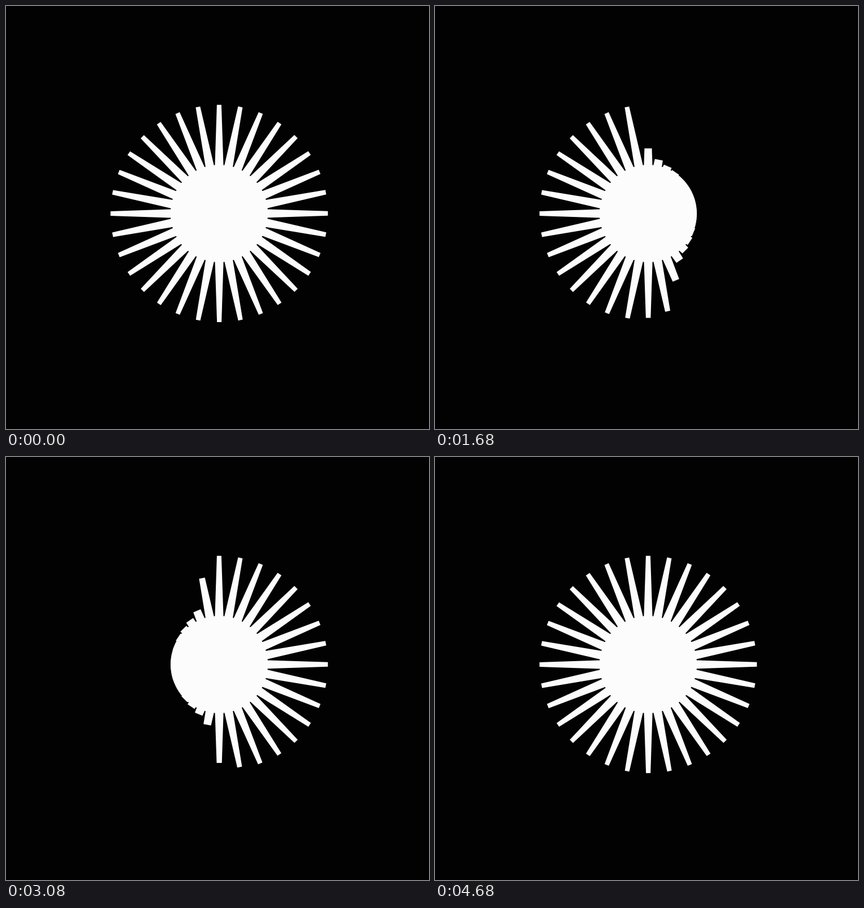
Animation of 748 by 748 pixels, one loop 5 s. Source, as an HTML page with a canvas:

```html
<!DOCTYPE html>
<html>
<head>
<meta charset="utf-8">
<style>
  html, body { margin: 0; height: 100%; overflow: hidden; background: #020202; }
  canvas { display: block; }
</style>
</head>
<body>
<canvas id="stage" width="748" height="748"></canvas>
<script>
const ctx = document.getElementById('stage').getContext('2d');
const LOOP = 5000, STEP = 40, TICK = 1000 / 60;
const RAYS = 32, STAGGER = 5; // ticks between neighbouring rays
const CX = 377, CY = 366.9, TILT = -0.0006;
const DISC = 86, INNER = 85.5, OUTER = 192.2;

// Ease along a bezier with horizontal handles at x1 (start) and x2 (end).
function ease(x, x1, x2) {
  if (x <= 0) return 0;
  if (x >= 1) return 1;
  let lo = 0, hi = 1;
  for (let i = 0; i < 24; i++) {
    const t = (lo + hi) / 2, u = 1 - t;
    if (3 * x1 * t * u * u + 3 * x2 * t * t * u + t * t * t < x) lo = t;
    else hi = t;
  }
  return lo * lo * (3 - 2 * lo);
}

function rayTip(tick) {
  const shrink = ease(tick / 60, 0.95, 0.035);
  const grow = ease((tick - 75) / 50, 1, 0.06);
  return OUTER - (OUTER - INNER) * (shrink - grow);
}

// Rays taper outwards; a shorter ray is the same wedge cut off earlier.
const halfWidth = r => 7.5 - 3.5 * (r - DISC) / (OUTER - DISC);

function drawRay(angle, tip) {
  const base = DISC - 6, wBase = halfWidth(base), wTip = halfWidth(tip);
  ctx.save();
  ctx.rotate(angle);
  ctx.beginPath();
  ctx.moveTo(-wBase, -base);
  ctx.lineTo(-wTip, -tip);
  ctx.lineTo(wTip, -tip);
  ctx.lineTo(wBase, -base);
  ctx.fill();
  ctx.restore();
}

function draw(ms) {
  const held = Math.floor(ms % LOOP / STEP) * STEP;
  const tick = Math.floor(held / TICK + 1e-6);
  ctx.setTransform(1, 0, 0, 1, 0, 0);
  ctx.fillStyle = '#020202';
  ctx.fillRect(0, 0, 748, 748);
  ctx.translate(CX, CY);
  ctx.fillStyle = '#fcfcfc';
  ctx.beginPath();
  ctx.arc(0, 0, DISC, 0, 2 * Math.PI);
  ctx.fill();
  for (let i = 0; i < RAYS; i++) {
    drawRay(TILT + i * 2 * Math.PI / RAYS, rayTip(tick - i * STAGGER));
  }
}

function frame() {
  draw(performance.now());
  requestAnimationFrame(frame);
}
frame();
</script>
</body>
</html>
```
